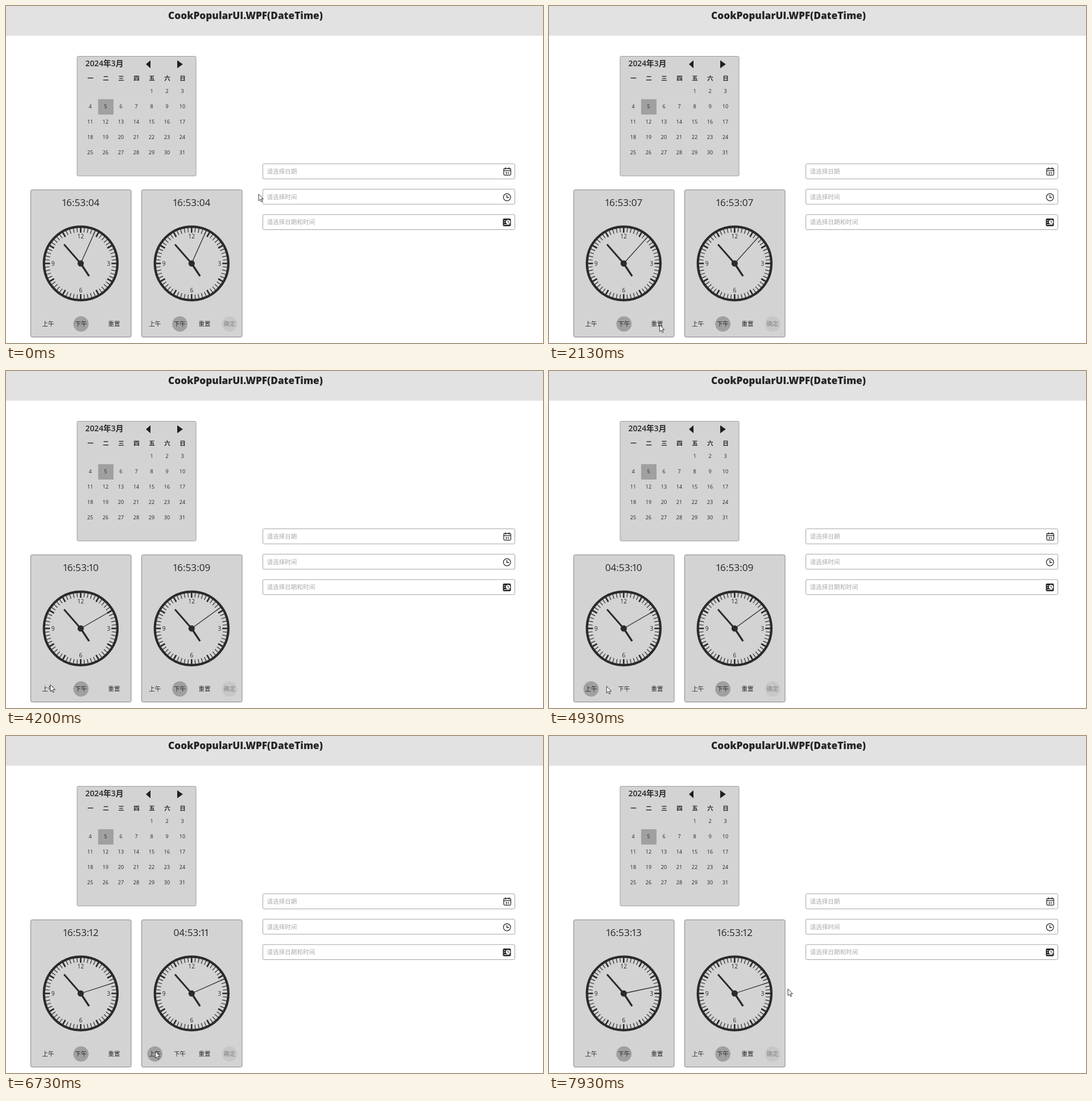
Animation, 944 px wide and 593 px high, one loop 8000 ms. Source, as an HTML page:

```html
<!DOCTYPE html>
<html lang="zh">
<head>
<meta charset="utf-8">
<title>DateTime</title>
<style>
  html, body { margin: 0; width: 100%; height: 100%; overflow: hidden; background: #fff; }
  svg { display: block; width: 944px; height: 593px; }
  text { font-family: "Open Sans", "Noto Sans CJK SC", "Noto Sans CJK JP", sans-serif; fill: #262626; }
</style>
</head>
<body>
<svg id="stage" viewBox="0 0 944 593" xmlns="http://www.w3.org/2000/svg"></svg>
<script>
const NS = 'http://www.w3.org/2000/svg';
const stage = document.getElementById('stage');
const LOOP = 8000, STEP = 1000 / 15;
const INK = '#2a2a2a', PANEL = '#d3d3d3', PICKED = '#a0a0a0';

function add(tag, attrs, parent = stage) {
  const el = document.createElementNS(NS, tag);
  for (const key in attrs) el.setAttribute(key, attrs[key]);
  parent.appendChild(el);
  return el;
}

function label(str, x, y, size, attrs = {}) {
  const el = add('text', { x, y, 'font-size': size, 'text-anchor': 'middle', ...attrs });
  el.textContent = str;
  return el;
}

function box(x, y, width, height, fill, stroke, rx = 2) {
  return add('rect', { x, y, width, height, rx, fill, stroke });
}

function drawCalendar() {
  box(125, 88.5, 209, 210.5, PANEL, '#9c9c9c');
  label('2024年3月', 139.5, 106.3, 13.8, { 'text-anchor': 'start', 'font-weight': 600 });
  add('path', { d: 'M246 102.5L254 95.5V109.5ZM301 95.5L310.8 102.5L301 109.5Z', fill: '#1f1f1f' });
  [...'一二三四五六日'].forEach((day, i) =>
    label(day, 148.5 + 27 * i, 130.5, 10.5, { 'font-weight': 700 }));
  add('rect', { x: 162, y: 164, width: 27, height: 27, fill: PICKED });
  for (let day = 1; day <= 31; day++) {
    const cell = day + 3;
    label(day, 148 + 27 * (cell % 7), 153.3 + 27 * Math.floor(cell / 7), 9);
  }
}

function drawField(y, hint) {
  const frame = box(451.5, y, 443, 26.5, '#fff', '#a3a3a3');
  label(hint, 458.5, y + 17.3, 10.6, { 'text-anchor': 'start', style: 'fill:#a9a9a9' });
  return frame;
}

function drawIcons() {
  const line = { fill: 'none', stroke: INK, 'stroke-width': 1.3 };
  add('rect', { x: 875, y: 286, width: 12.4, height: 11.6, rx: 1.5, ...line });
  add('path', { d: 'M875 289.6H887.4M878.2 284V287.5M884.3 284V287.5', ...line });
  label('31', 881.2, 296.2, 6, { 'font-weight': 700 });
  add('circle', { cx: 880.7, cy: 336.5, r: 6.3, ...line });
  add('path', { d: 'M880.5 332.5V337H884.2', ...line });
  add('rect', { x: 873.5, y: 374, width: 14, height: 13.6, rx: 2, fill: '#222' });
  add('path', { d: 'M875.2 377.5H878M875.2 380.7H877.6M875.2 384.5H885.5', stroke: '#fff', 'stroke-width': 1.1 });
  add('circle', { cx: 882.6, cy: 380, r: 3.8, fill: '#fff' });
  add('path', { d: 'M882.4 377.6V380.4H884.6', fill: 'none', stroke: '#222' });
}

function hand(cx, angle, length, width) {
  return add('line', { x1: cx, y1: 453, x2: cx, y2: 453 - length, stroke: INK,
    'stroke-width': width, transform: `rotate(${angle} ${cx} 453)` });
}

function drawClock(left, buttons, xs) {
  const cx = left + 88.3, cy = 453;
  box(left + .5, 323.5, 176.5, 259, PANEL, '#868686', 2.5);
  const time = label('', cx - .2, 351.6, 17.2, { 'font-weight': 500 });
  add('circle', { cx, cy, r: 64.6, fill: 'none', stroke: INK, 'stroke-width': 4.2 });
  for (let i = 0; i < 60; i++) {
    const major = i % 5 === 0;
    add('line', { x1: cx, y1: cy - 63, x2: cx, y2: cy - (major ? 54 : 55), stroke: INK,
      'stroke-width': major ? 2.6 : 1.2, transform: `rotate(${i * 6} ${cx} ${cy})` });
  }
  label('12', cx, 409.2, 10);
  label('3', cx + 49, 456.7, 10);
  label('6', cx, 504.2, 10);
  label('9', cx - 48.7, 456.7, 10);
  hand(cx, 146.5, 26.8, 3.4);
  hand(cx, 318.8, 44.5, 3);
  const second = hand(cx, 0, 63, 1.3);
  add('circle', { cx, cy, r: 5.5, fill: INK });
  const discs = buttons.map((name, i) => {
    const off = name === '确定';
    const disc = add('circle', { cx: xs[i], cy: 559.5, r: 13.4, fill: off ? '#c7c7c7' : PICKED });
    label(name, xs[i], 563.3, 10.5, off ? { style: 'fill:#858585' } : {});
    return disc;
  });

  return (textSec, handSec, morning, resetDown) => {
    const str = `${morning ? '04' : '16'}:53:${String(textSec).padStart(2, '0')}`;
    time.textContent = str;
    // the figure 1 sits closer to its neighbours
    time.setAttribute('dx', [...str].map((c, i) =>
      i ? -1.6 * ((c === '1') + (str[i - 1] === '1')) : 0).join(' '));
    second.setAttribute('transform', `rotate(${handSec * 6} ${cx} ${cy})`);
    [morning, !morning, resetDown].forEach((on, i) =>
      discs[i].setAttribute('visibility', on ? 'visible' : 'hidden'));
  };
}

add('rect', { width: 944, height: 52.3, fill: '#e2e2e2' });
label('CookPopularUI.WPF(DateTime)', 421, 22.8, 17.2, { 'font-weight': 800 });
drawCalendar();
const leftClock = drawClock(43, ['上午', '下午', '重置'], [74, 131.8, 190]);
const rightClock = drawClock(238, ['上午', '下午', '重置', '确定'], [261.7, 305.6, 349, 393]);
drawField(277.7, '请选择日期');
drawField(322.3, '请选择时间');
const lastField = drawField(367, '请选择日期和时间');
drawIcons();
const cursor = add('path', { d: 'M0 0V11.8L2.7 9.3L4.7 13.6L6.5 12.8L4.6 8.6H8.3Z',
  fill: '#fff', stroke: '#222', 'stroke-width': .9, 'stroke-linejoin': 'round' });

// pointer stops: time, x, y
const path = [
  [0, 444, 331], [130, 444, 324], [200, 444, 324], [370, 400, 340], [570, 470, 372],
  [730, 519, 353], [800, 519, 353], [867, 440, 400], [1130, 297, 522], [1670, 240, 562],
  [2200, 188, 561], [2800, 188, 561], [3130, 101, 569], [3670, 104, 564], [4200, 78, 552],
  [4600, 78, 552], [5200, 120, 557], [5340, 120, 557], [5470, 133, 557], [5740, 133, 557],
  [6470, 262, 555], [6730, 262, 555], [7530, 385, 570], [7930, 420, 445]
];

function pointer(t) {
  const i = path.findIndex(p => p[0] > t);
  if (i < 0) return path[path.length - 1].slice(1);
  const [t0, x0, y0] = path[i - 1], [t1, x1, y1] = path[i];
  const k = (t - t0) / (t1 - t0);
  return [x0 + (x1 - x0) * k, y0 + (y1 - y0) * k];
}

const ticks = [130, 1130, 2130, 3130, 4200, 5200, 6200, 7200];
const during = (t, from, to) => t >= from && t < to;

function render(ms) {
  const t = Math.floor((ms + 5) / STEP) * STEP;
  const sec = 4 + ticks.filter(at => t >= at - 5).length;
  const ahead = sec >= 8 ? 1 : 0;
  const reset = during(t, 2460, 3120) ? 1 : 0;
  leftClock(sec + ahead, sec + ahead + reset, during(t, 4590, 5795), during(t, 2460, 2725));
  rightClock(sec, sec, during(t, 6725, 7195), false);

  const [x, y] = pointer(t);
  cursor.setAttribute('transform', `translate(${x.toFixed(1)} ${y.toFixed(1)})`);
  const over = x > 451 && y > 367 && y < 394;
  lastField.setAttribute('stroke', over ? '#666' : '#a3a3a3');
}

const start = performance.now();
function frame() {
  render((performance.now() - start) % LOOP);
  requestAnimationFrame(frame);
}
render(0);
requestAnimationFrame(frame);
</script>
</body>
</html>
```
